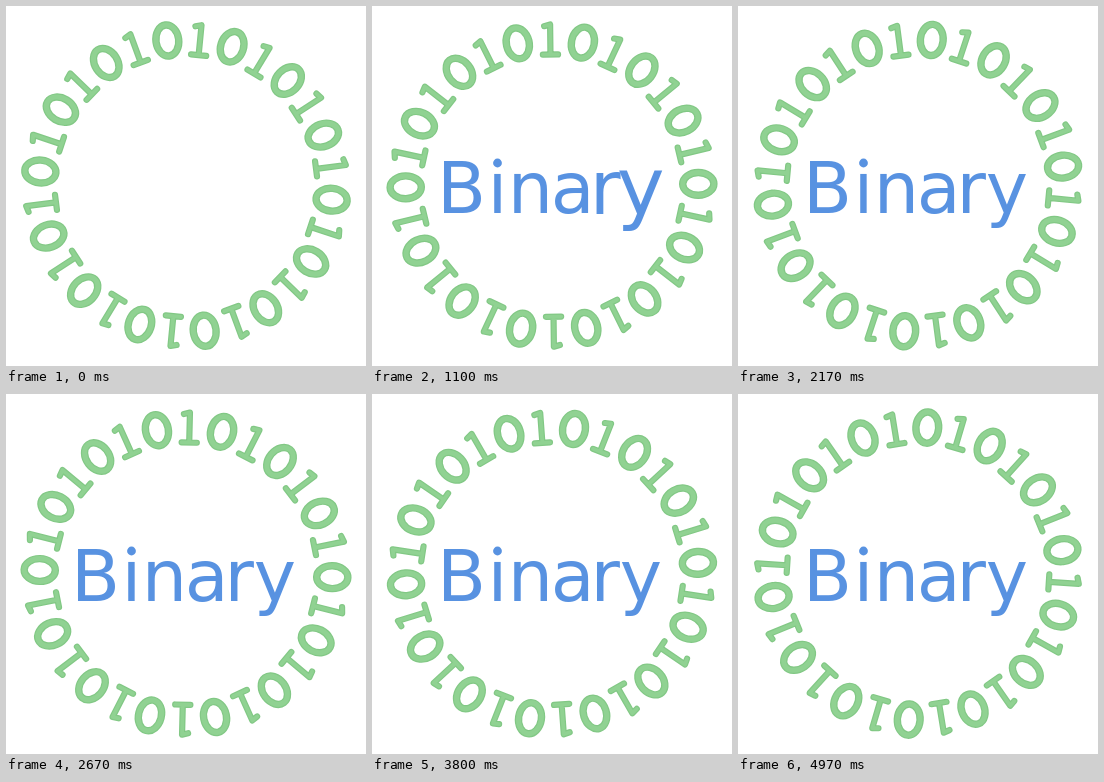
An HTML page with a canvas for the animation above (5 s loop, 360 px wide and 360 px high).

```html
<!DOCTYPE html>
<html lang="en">
<head>
<meta charset="utf-8">
<title>Binary</title>
<style>
  html, body { margin: 0; width: 100%; height: 100%; overflow: hidden; background: #fff; }
  canvas { display: block; width: 360px; height: 360px; }
</style>
</head>
<body>
<canvas id="stage" width="360" height="360"></canvas>
<script>
const ctx = document.getElementById('stage').getContext('2d');
const LOOP = 5000, FPS = 30;
const DIGITS = 28, RADIUS = 146.3;
const RAD = Math.PI / 180;
const BLUE = '#5892e1', GREEN = '#82c885', LIGHT = '#90d292';

// glyph, centre x, pivot y
const LETTERS = [
  ['B', 89.5, 181], ['\u0131', 125.5, 181], ['n', 158.3, 187],
  ['a', 200.7, 187], ['r', 233.2, 187], ['y', 268.8, 194]
];
const BASELINE = 206.8, POP_START = 160, POP_STEP = 133, POP_TIME = 500;

const zero = new Path2D();
zero.ellipse(0, 0, 11.4, 15.6, 0, 0, Math.PI * 2);
const one = new Path2D('M-6 -13.2 L0 -14.8 V15 M-7.6 15.2 H7.6');

function strokePath(path, width, color) {
  ctx.lineWidth = width;
  ctx.strokeStyle = color;
  ctx.stroke(path);
}

function drawRing(t) {
  const turn = -7.33 + 17.74 * t / 1000;
  for (let i = 0; i < DIGITS; i++) {
    const isOne = i % 2 === 1;
    const path = isOne ? one : zero;
    const width = isOne ? 6.2 : 7.4;
    ctx.save();
    ctx.translate(180, 179.6);
    ctx.rotate((turn + i * 360 / DIGITS) * RAD);
    ctx.translate(0, -RADIUS);
    strokePath(path, width, GREEN);
    strokePath(path, width - 2.4, LIGHT);
    ctx.restore();
  }
}

function backOut(u) {
  if (u <= 0) return 0;
  if (u >= 1) return 1;
  const c = 2, v = u - 1;
  return 1 + (c + 1) * v ** 3 + c * v * v;
}

function drawWord(t) {
  ctx.font = '71.5px "DejaVu Sans", sans-serif';
  ctx.textAlign = 'center';
  ctx.fillStyle = BLUE;
  LETTERS.forEach(([glyph, x, y], i) => {
    const s = backOut((t - POP_START - i * POP_STEP) / POP_TIME);
    if (s <= 0) return;
    ctx.save();
    ctx.translate(x, y);
    ctx.scale(s, s);
    ctx.fillText(glyph, 0, BASELINE - y);
    if (glyph === '\u0131') {
      ctx.beginPath();
      ctx.arc(0, 157 - y, 4.4, 0, Math.PI * 2);
      ctx.fill();
    }
    ctx.restore();
  });
}

function draw(now) {
  const frame = Math.floor((now % LOOP + 5) * FPS / 1000);
  const t = frame * 1000 / FPS % LOOP;
  ctx.fillStyle = '#fff';
  ctx.fillRect(0, 0, 360, 360);
  ctx.lineCap = ctx.lineJoin = 'round';
  drawRing(t);
  drawWord(t);
}

const start = performance.now();
function tick() {
  draw(performance.now() - start);
  requestAnimationFrame(tick);
}
tick();
</script>
</body>
</html>
```
